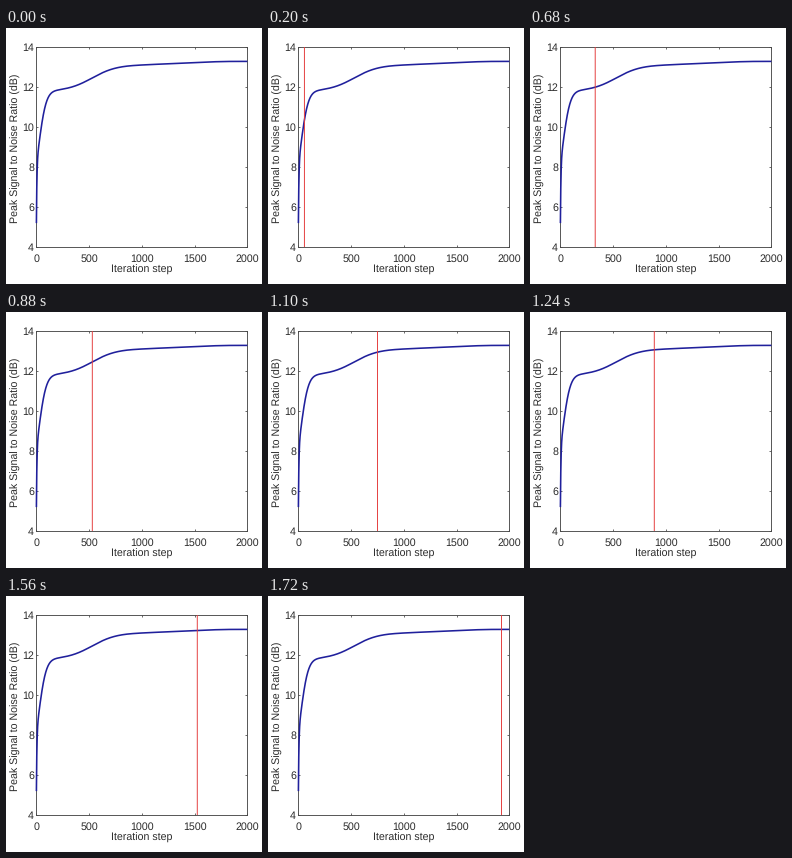
These frames come from a looping animation (256 px wide and 256 px high, 1.74 s). A matplotlib script:

```python
import numpy as np
import matplotlib.pyplot as plt
from matplotlib.animation import FuncAnimation

SIZE, DPI = 256, 64
PX = 72 / DPI                      # points per pixel
FRAMES, INTERVAL = 87, 20
INK, FRAME = "#2c2c2c", "#484848"
LEFT, TOP, WIDTH, HEIGHT = 30.4, 19.4, 211, 200

plt.rcParams.update({
    "font.family": "Liberation Sans",
    "text.hinting": "none",
    "text.color": INK,
    "toolbar": "None",
})


def psnr(s):
    """Two quick rises, a slow S-shaped gain and a gentle final drift."""
    rise = -3.3 * np.exp(-s / 5) - 3.3 * np.exp(-(s / 65) ** 1.5)
    gain = 1.34 / (1 + np.exp((528 - s) / 118))
    t = np.clip((s - 900) / 1000, 0, 1)
    return 11.8 + rise + gain + 0.16 * t * t * (3 - 2 * t)


def step_at(frame):
    """The sweep takes larger strides through each stage."""
    return np.interp(frame, [0, 17.5, 27.5, 67.5, 87], [0, 100, 200, 1000, 1975])


def label(x, y, text, rotation=0):
    fig.text(x / SIZE, 1 - y / SIZE, text, size=10.6 * PX, ha="center",
             va="baseline", rotation=rotation, rotation_mode="anchor")


fig = plt.figure(figsize=(SIZE / DPI, SIZE / DPI), dpi=DPI, facecolor="white")
ax = fig.add_axes([LEFT / SIZE, 1 - (TOP + HEIGHT) / SIZE,
                   WIDTH / SIZE, HEIGHT / SIZE])
ax.set(xlim=(0, 2000), ylim=(4, 14),
       xticks=range(0, 2001, 500), yticks=range(4, 15, 2))
ax.tick_params(direction="in", top=True, right=True, length=2.2 * PX,
               width=0.8 * PX, color=FRAME, labelcolor=INK, labelsize=10.6 * PX)
ax.tick_params(axis="x", pad=6.2 * PX)
ax.tick_params(axis="y", pad=2.4 * PX)
for spine in ax.spines.values():
    spine.set(color=FRAME, linewidth=0.9 * PX)

label(136, 244.8, "Iteration step")
label(12.8, 120, "Peak Signal to Noise Ratio (dB)", rotation=90)

steps = 2000 * np.linspace(0, 1, 800) ** 2
ax.plot(steps, psnr(steps), color="#20209c", lw=1.6 * PX,
        solid_capstyle="butt", clip_on=False, zorder=3)

marker = ax.axvline(0, color="#e43c3c", lw=0.95 * PX, zorder=4, snap=False)


def update(frame):
    x = step_at(frame)
    marker.set_xdata([x, x])
    marker.set_visible(frame > 0)
    return (marker,)


anim = FuncAnimation(fig, update, frames=FRAMES, init_func=lambda: update(0),
                     interval=INTERVAL, repeat=True, repeat_delay=0)
plt.show()
```
